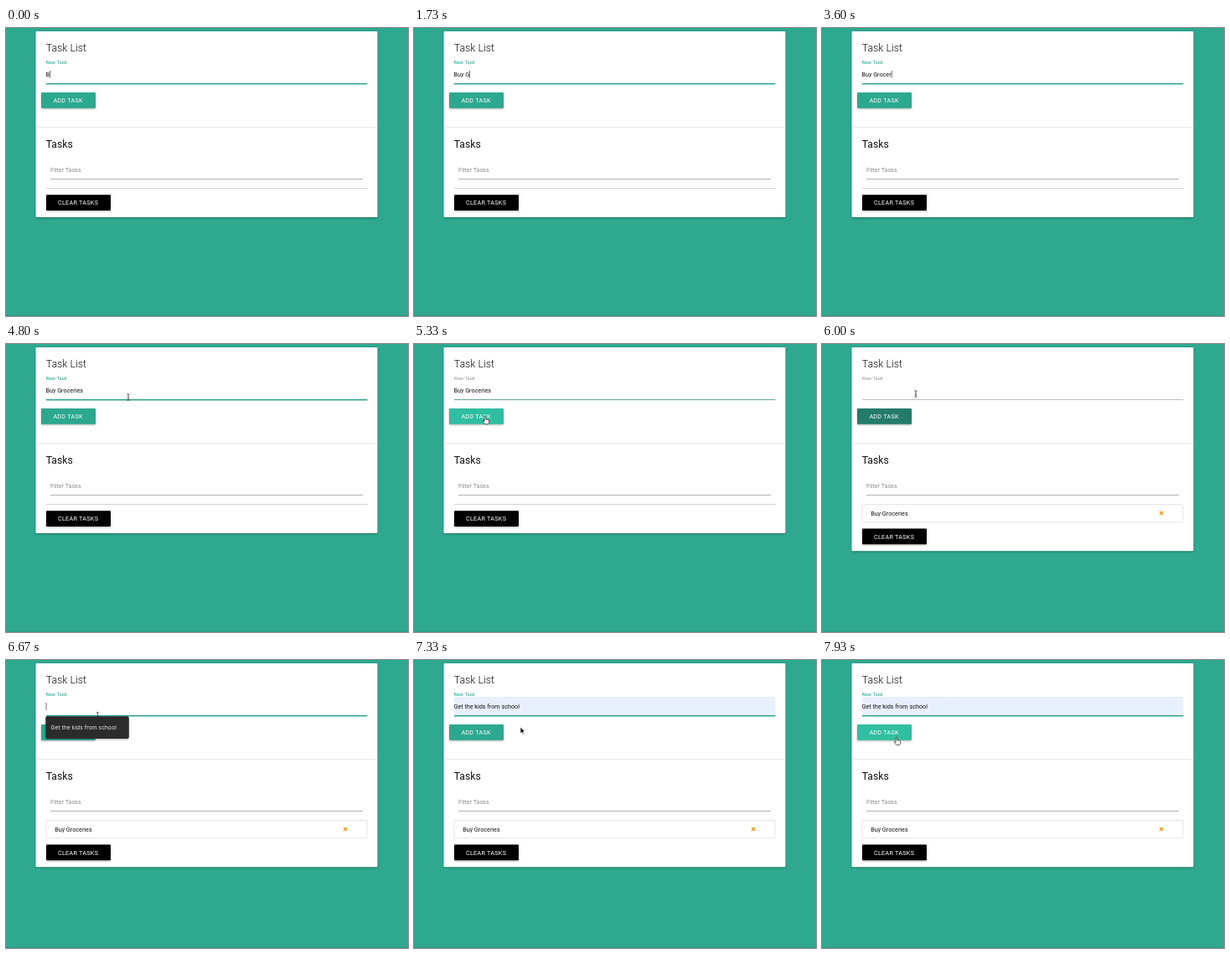
Recreate the animation shown at these times as an HTML page. Size 480 px wide and 344 px high, loop 8 s.

```html
<!DOCTYPE html>
<html lang="en">
<head>
<meta charset="utf-8">
<title>Task List</title>
<style>
  html, body { margin: 0; width: 100%; height: 100%; overflow: hidden; background: #2ea88f; }
  svg { display: block; width: 100vw; height: 100vh; }
  text { font: 400 7.22px Roboto, Arial, sans-serif; fill: #111; white-space: pre; }
  .title { font-size: 12.2px; }
  .light { font-weight: 300; font-size: 12.4px; }
  .label { font-size: 5.8px; }
  .btn { fill: #fff; letter-spacing: .26px; }
  .hint { fill: #8e8e8e; }
  .menu { font: 400 6.8px Inter, sans-serif; fill: #e9e9e9; }
  .lift { filter: drop-shadow(0 1px 1px rgba(0, 0, 0, .3)); }
  .pointer { stroke: #222; stroke-width: .7; stroke-linejoin: round; fill: #fff; }
</style>
</head>
<body>
<svg viewBox="0 0 480 344">
  <rect width="480" height="344" fill="#2ea88f"/>
  <rect y="343" width="480" height="1" fill="#299983"/>
  <rect id="card" class="lift" x="35.5" y="4" width="408" height="222" rx="1" fill="#fff"/>
  <text class="light" x="47.7" y="28.3">Task List</text>

  <rect id="fill" x="48" y="44" width="383.5" height="22" fill="#e8f0fe"/>
  <text id="label" class="label" x="47.6" y="43">New Task</text>
  <rect id="line" x="48" y="66" width="383.5" height="1"/>
  <text id="entry" x="47.5" y="57.7"></text>
  <rect id="caret" y="50.8" width=".7" height="8.8" fill="#333"/>

  <rect id="add" class="lift" x="42" y="77" width="65" height="18.7" rx="1"/>
  <text class="btn" x="56.4" y="88.9">ADD TASK</text>

  <rect x="35.5" y="118.3" width="408" height=".8" fill="#e6e6e6"/>
  <text class="title" x="47.7" y="143.4">Tasks</text>
  <text class="hint" x="52.9" y="172.4">Filter Tasks</text>
  <rect x="53" y="180" width="373" height=".8" fill="#9e9e9e"/>

  <rect id="empty" x="48" y="191" width="383.5" height="1" fill="#d2d2d2"/>
  <g id="item">
    <rect x="48" y="191.5" width="383" height="21.3" rx="1" fill="#fff" stroke="#dedede" stroke-width=".8"/>
    <text x="58.2" y="204.6">Buy Groceries</text>
    <path d="M403.3 200l4 4m0-4l-4 4" stroke="#e3a033" stroke-width="1.7"/>
  </g>
  <g id="clear">
    <rect class="lift" x="48" y="199.2" width="77" height="18.7" rx="1" fill="#000"/>
    <text class="btn" x="62" y="211.2">CLEAR TASKS</text>
  </g>

  <g id="menu">
    <rect class="lift" x="47.3" y="67.2" width="99.5" height="26.8" rx="2" fill="#2b2b2b"/>
    <rect id="glow" x="47.3" y="71.5" width="99.5" height="18" fill="#484848"/>
    <text class="menu" x="53.4" y="83">Get the kids from school</text>
  </g>

  <g id="mouse">
    <path id="arrow" class="pointer" style="fill:#111;stroke:#fff" d="M0 0V8L1.9 6.3 3.1 9 4.4 8.4 3.2 5.8H5.7Z"/>
    <path id="hand" class="pointer" d="M-.8 .6a.8.8 0 0 1 1.6 0V3.2l3 .6q1 .3 .9 1.3l-.4 2.6-.6 1.3H-.3l-2.5-3.2q-.4-.9 .5-1l1.5.9z"/>
    <path id="beam" d="M-1.6-3.8Q0-3.8 0-2.8 0-3.8 1.6-3.8M0-3V3M-1.6 3.8Q0 3.8 0 2.8 0 3.8 1.6 3.8M-.8 .9H.8" fill="none" stroke="#333" stroke-width=".8"/>
  </g>
</svg>
<script>
const LOOP = 8000;
const TASK = 'Buy Groceries', NEXT = 'Get the kids from school';
const el = {};
document.querySelectorAll('[id]').forEach(n => el[n.id] = n);

// Times at which each letter after the first is typed
const KEYS = [330, 470, 600, 1730, 2130, 2200, 2730, 3130, 3600, 3670, 4000, 4200];
const ADDED = 5400, FOCUS = 6330, MENU = 6450, PREVIEW = 6870, PICK = 7130;

// Pointer stops: time, x, y
const PATH = [
  [4730, 150, 62], [5200, 85, 86.7], [5500, 85, 86.7], [6000, 112, 59.5],
  [6300, 110, 64], [6530, 109, 66], [6640, 109, 66], [7000, 127, 80],
  [7480, 127, 80], [7900, 89, 92.5]
];

const TEAL = [31, 157, 136], GREY = [150, 150, 150], RULE = [175, 175, 175];
const BASE = [43, 168, 143], BRIGHT = [47, 190, 161], DARK = [35, 124, 106];

const ramp = (t, start, len) => Math.min(1, Math.max(0, (t - start) / len));
const ease = p => p * p * (3 - 2 * p);
const mix = (a, b, p) => a.map((v, i) => v + (b[i] - v) * p);
const rgb = c => `rgb(${c.map(Math.round)})`;
const show = (node, on) => node.setAttribute('visibility', on ? 'inherit' : 'hidden');

function pointerAt(t) {
  const i = PATH.findIndex(p => p[0] > t);
  if (i < 0) return PATH[PATH.length - 1].slice(1);
  if (i === 0) return PATH[0].slice(1);
  const [a, b] = [PATH[i - 1], PATH[i]];
  return mix(a, b, ease(ramp(t, a[0], b[0] - a[0]))).slice(1);
}

function entryAt(t) {
  if (t < ADDED) return TASK.slice(0, 1 + KEYS.filter(k => k <= t).length);
  return t < PREVIEW ? '' : NEXT;
}

function caretAt(t) {
  if (t >= FOCUS) return t < PREVIEW;
  if (t >= 4670) return false;
  const last = KEYS.filter(k => k <= t).pop() || 0;
  return t - last < 530 || t - last >= 1000;
}

function buttonAt(t) {
  let c = mix(BASE, BRIGHT, ramp(t, 5050, 200));
  c = mix(c, DARK, ramp(t, 5680, 200));
  c = mix(c, BASE, ramp(t, FOCUS, 200));
  return mix(c, BRIGHT, ramp(t, 7700, 200));
}

function drawPointer(t) {
  const [x, y] = pointerAt(t);
  const onMenu = t >= MENU && t < PICK && y > 67;
  const onButton = !onMenu && x > 42 && x < 107 && y > 77 && y < 96;
  const onInput = !onMenu && y > 45 && y < 67;
  show(el.mouse, t >= PATH[0][0]);
  show(el.hand, onButton);
  show(el.beam, onInput);
  show(el.arrow, !onButton && !onInput);
  el.mouse.setAttribute('transform', `translate(${x} ${y})`);
}

function draw(t) {
  const added = t >= ADDED;
  const blur = len => ramp(t, 5180, len) - ramp(t, FOCUS, len);

  el.entry.textContent = entryAt(t);
  show(el.caret, caretAt(t));
  el.caret.setAttribute('x', 47.7 + el.entry.getComputedTextLength());
  show(el.fill, t >= PREVIEW);
  el.label.style.fill = rgb(mix(TEAL, GREY, blur(150)));
  el.line.setAttribute('fill', rgb(mix(TEAL, RULE, blur(280))));
  el.line.setAttribute('height', 1.4 - .6 * blur(280));
  el.add.setAttribute('fill', rgb(buttonAt(t)));

  el.card.setAttribute('height', added ? 243.3 : 222);
  el.clear.setAttribute('transform', `translate(0 ${added ? 21.4 : 0})`);
  show(el.item, added);
  show(el.empty, !added);

  show(el.menu, t >= MENU && t < PICK + 120);
  el.menu.setAttribute('opacity', ramp(t, MENU, 70) - ramp(t, PICK, 120));
  show(el.glow, t >= PREVIEW && t < PICK + 120);
  drawPointer(t);
}

const start = performance.now();
function tick() {
  draw((performance.now() - start) % LOOP);
  requestAnimationFrame(tick);
}
tick();
</script>
</body>
</html>
```
